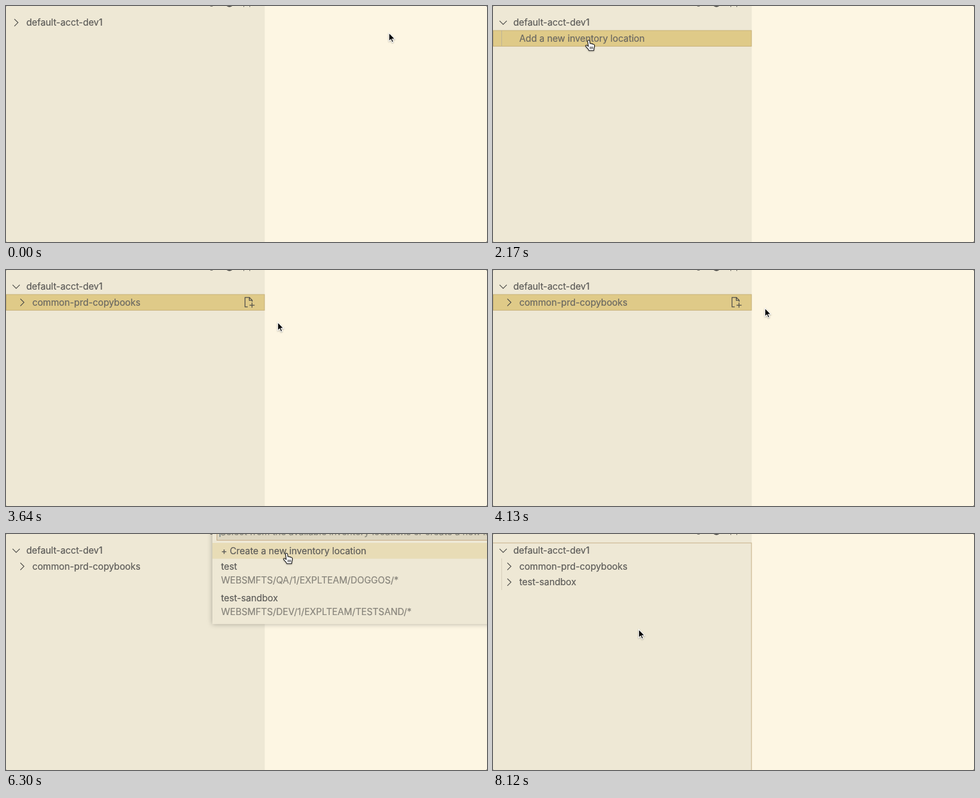
An HTML page for the animation above (8190 ms loop, 804 by 396 pixels).

```html
<!DOCTYPE html>
<html lang="en">
<head>
<meta charset="utf-8">
<title>Inventory locations</title>
<style>
  html, body { margin: 0; width: 100%; height: 100%; overflow: hidden; background: #55534c; }
  svg { display: block; width: 804px; height: 396px; border-radius: 2px; }
  text {
    font: 15.28px Inter, "Liberation Sans", sans-serif;
    fill: #5d5c59; stroke: #5d5c59; stroke-width: .22; white-space: pre;
  }
  .desc { fill: #87847b; stroke: #87847b; }
  .hint { fill: #86867c; stroke: #86867c; }
  .active text { fill: #6a6862; stroke: #6a6862; }
  .line { fill: none; stroke: #4a4a47; stroke-width: 1.25; }
  .tip { filter: drop-shadow(0 1px 1px rgba(0, 0, 0, .3)); }
</style>
</head>
<body>
<svg id="stage" viewBox="0 0 804 396">
  <rect width="804" height="396" fill="#fdf6e3"/>
  <rect width="432.5" height="396" fill="#eee8d5"/>
  <g class="line">
    <path d="M340.5 -1Q343.5 1.4 346.5 -1"/>
    <path d="M369 -1Q373.5 2.6 378 -1" stroke-width="2"/>
    <path d="M397.5 0v1.5M407.5 0v1.5" stroke-width="1"/>
  </g>
  <g id="tree"></g>
  <path id="guide" fill="none" stroke="#d5cebb"/>
  <rect id="outline" x="-1" y="15" width="433" height="400" fill="none" stroke="#cdb793" stroke-width="1.2"/>
  <g id="picks"></g>
  <g id="arrow" class="tip">
    <path d="M-.9 0V14L2.3 11.1L4.4 16L6.7 15L4.6 10.2H8.9Z" stroke="#fff" stroke-width="1.1"/>
  </g>
  <g id="hand" class="tip" stroke="#111" stroke-width="1.1" stroke-linejoin="round">
    <path fill="#fff" d="M-1.7 1.7Q-1.6 .3 -.1 .3Q1.4 .3 1.6 1.8L2.2 6.2Q3.6 5.2 4.7 6.6Q6.1 5.8 7.2 7.3Q9 6.8 9.5 8.7Q10 11 8.9 14L8.5 17.8H.4Q-.8 15 -2.9 13.1Q-5.4 10.6 -5.1 9.4Q-4 8.1 -2.2 9.6L-.6 10.9Z"/>
    <path d="M2.4 11.2v4M4.5 11.2v4M6.6 11.2v4" stroke-width=".9"/>
  </g>
</svg>
<script>
const LOOP = 8190, STEP = 70, PANEL = 432.5;
const ROW_TOP = 14.6, ROW_H = 26.5;
const $ = id => document.getElementById(id);
const show = (node, on) => { node.style.display = on ? '' : 'none'; };
const within = (t, a, b) => t >= a && t < b;

function add(parent, tag, attrs, text) {
  const node = document.createElementNS('http://www.w3.org/2000/svg', tag);
  for (const key in attrs) node.setAttribute(key, attrs[key]);
  if (text) node.textContent = text;
  return parent.appendChild(node);
}

function treeRow(index, label, indent, icon) {
  const top = ROW_TOP + index * ROW_H, mid = top + ROW_H / 2;
  const group = add($('tree'), 'g');
  const back = add(group, 'rect', { x: .5, y: top, width: PANEL - 1, height: ROW_H });
  add(group, 'text', { x: indent, y: mid + 5.5 }, label);
  const chevron = add(group, 'path', { class: 'line' });
  const action = add(group, 'path', {
    class: 'line', d: icon || '', transform: `translate(398 ${mid - 9})`
  });
  const x = indent - 17;
  return { group, back, chevron, action, index,
    closed: `M${x - 3} ${mid - 6}l6 6l-6 6`,
    open: `M${x - 6} ${mid - 3}l6 6l6 -6` };
}

function paintRow(row, on, look, chevron, action) {
  const fills = { active: '#dfca88', idle: '#d1cbb8', hover: '#eae0c0' };
  show(row.group, on);
  row.group.setAttribute('class', look || '');
  row.back.setAttribute('fill', fills[look] || 'none');
  row.back.setAttribute('stroke', look === 'active' ? '#c6b077' : 'none');
  row.chevron.setAttribute('d', chevron ? row[chevron] : '');
  show(row.action, action);
}

const newFile = 'M6 16.5H1.5V.8H9L13.5 5.3V8M8.6 .8V5.6H13.5M13.2 9.5V18M9 13.8H17.5';
const plus = 'M9 2V16M2 9H16';
const root = treeRow(0, 'default-acct-dev1', 34, plus);
const prompt = treeRow(1, 'Add a new inventory location', 44);
const common = treeRow(1, 'common-prd-copybooks', 44, newFile);
const sandbox = treeRow(2, 'test-sandbox', 44, newFile);

const places = [
  ['common-prd-copybooks', 'WEBSMFTS/PRD/2/EXPLTEAM/DOGGOS/COBCOPY'],
  ['test', 'WEBSMFTS/QA/1/EXPLTEAM/DOGGOS/*'],
  ['test-sandbox', 'WEBSMFTS/DEV/1/EXPLTEAM/TESTSAND/*']
];

function makePick(items, start, end) {
  const group = add($('picks'), 'g');
  const bottom = 41.5 + items.length * 52.8 + 4;
  add(group, 'rect', { x: 345, y: -20, width: 480, height: bottom + 20, fill: '#eee8d5',
    style: 'filter:drop-shadow(0 0 4px rgba(0,0,0,.3))' });
  add(group, 'rect', { x: 352.5, y: -20, width: 480, height: 30.5, fill: '#ddd6c1', stroke: '#c5aa84' });
  add(group, 'text', { x: 358, y: 1.5, class: 'hint' },
    'Select from the available inventory locations or create a new inventory location');
  const caret = add(group, 'rect', { x: 357, y: 0, width: 1.2, height: 5, fill: '#586e75' });
  add(group, 'rect', { x: 345, y: 15, width: 460, height: 26.5, fill: '#e8dcb6' });
  const hover = add(group, 'rect', { x: 345, width: 460, height: 52.8, fill: '#eae0c0' });
  add(group, 'text', { x: 359.5, y: 33.5 }, '+ Create a new inventory location');
  items.forEach(([label, path], i) => {
    const y = 60 + i * 52.8;
    add(group, 'text', { x: 359.5, y }, label);
    add(group, 'text', { x: 359.5, y: y + 23, class: 'desc' }, path);
  });
  return { group, caret, hover, bottom, start, end, count: items.length };
}

const picks = [makePick(places, 2240, 3430), makePick(places.slice(1), 5880, 7000)];

// from, to, control x, control y, end x, end y
const moves = [
  [140, 770, 400, 84, 163, 18],
  [1330, 1680, 152, 35, 159, 57],
  [1820, 1960, 160, 57, 160, 57],
  [2450, 3220, 190, 170, 450, 97],
  [3220, 3290, 451, 92, 452, 88],
  [3570, 4130, 490, 84, 455.5, 64],
  [4130, 4690, 370, 70, 274.5, 109],
  [4970, 5740, 330, 155, 407, 26],
  [6020, 6300, 440, 24, 469, 32],
  [6300, 6860, 455, 64, 478, 118],
  [7420, 8120, 380, 184, 244.5, 160]
];

function pointer(t) {
  let x = 641, y = 45;
  for (const [from, to, cx, cy, ex, ey] of moves) {
    if (t <= from) break;
    const p = Math.min(1, (t - from) / (to - from));
    const u = p * p * (3 - 2 * p), v = 1 - u;
    x = v * v * x + 2 * u * v * cx + u * u * ex;
    y = v * v * y + 2 * u * v * cy + u * u * ey;
  }
  return { x, y };
}

function render(t) {
  const { x, y } = pointer(t);
  const pick = picks.find(p => within(t, p.start, p.end));
  const overPick = pick && x > 345 && y < pick.bottom;
  const overPanel = x < PANEL && !overPick;
  const rows = t < 1190 ? 1 : t < 7140 ? 2 : 3;
  const slot = Math.floor((y - ROW_TOP) / ROW_H);
  const hovered = overPanel && slot < rows ? slot : -1;
  const look = (row, active, idle) =>
    active ? 'active' : idle ? 'idle' : hovered === row.index ? 'hover' : '';

  const rootActive = within(t, 1050, 2100);
  paintRow(root, true, look(root, rootActive), t < 1120 ? 'closed' : 'open',
    t > 4970 && hovered === 0);
  paintRow(prompt, within(t, 1190, 3640),
    look(prompt, within(t, 2100, 2240) || t >= 3430, !!pick));
  const commonActive = within(t, 3640, 4760);
  paintRow(common, t >= 3640, look(common, commonActive), 'closed',
    commonActive || hovered === 1);
  paintRow(sandbox, t >= 7140, look(sandbox), 'closed', hovered === 2);

  show($('outline'), within(t, 910, 1050) || within(t, 4760, 5810) || t >= 7210);
  show($('guide'), rows > 1 && (overPanel || pick === picks[0]));
  $('guide').setAttribute('d', `M14.5 41V${41 + (rows - 1) * ROW_H}`);
  $('guide').setAttribute('stroke', within(t, 2100, 3640) ? '#bdb396' : '#d5cebb');

  for (const p of picks) {
    show(p.group, p === pick);
    if (p !== pick) continue;
    const item = Math.floor((y - 5 - 41.5) / 52.8);
    show(p.hover, overPick && item >= 0 && item < p.count);
    p.hover.setAttribute('y', 41.5 + item * 52.8);
    show(p.caret, (t - p.start) % 1000 < 500);
  }

  const pointing = overPick || hovered >= 0;
  show($('hand'), pointing);
  show($('arrow'), !pointing);
  $(pointing ? 'hand' : 'arrow').setAttribute('transform', `translate(${x} ${y})`);
}

function tick() {
  const t = performance.now() % LOOP;
  render(Math.floor(t / STEP) * STEP);
  requestAnimationFrame(tick);
}
tick();
</script>
</body>
</html>
```
